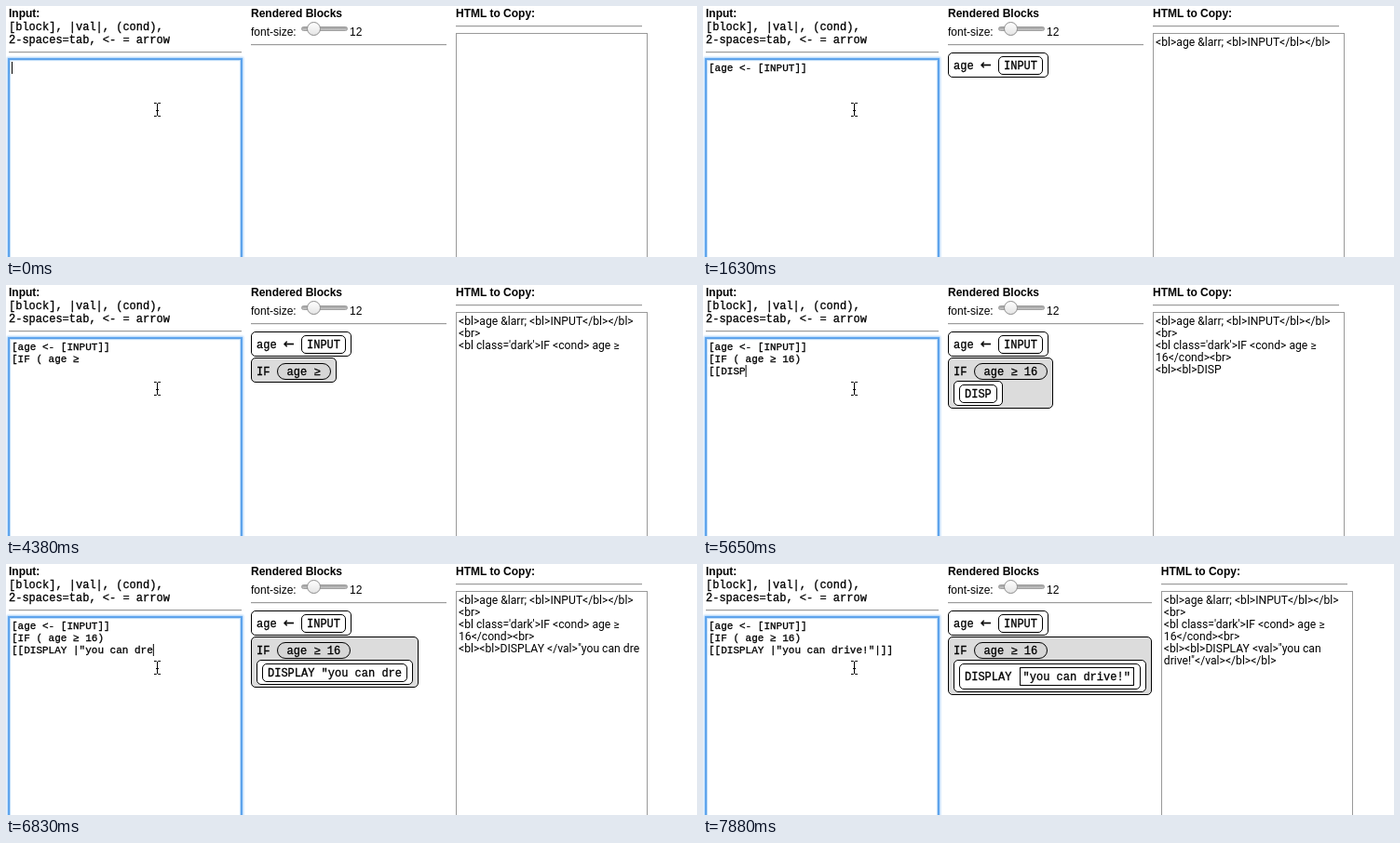
Recreate the animation shown at these times as an HTML page. Size 742 by 270 pixels, loop 8000 ms.

```html
<!DOCTYPE html>
<html lang="en">
<head>
<meta charset="utf-8">
<title>Block markup editor</title>
<style>
  html, body { margin: 0; width: 100%; height: 100%; overflow: hidden; background: #fff; }
  body { position: relative; color: #000; font: 12px/14px "Liberation Sans", sans-serif; }
  .at { position: absolute; white-space: pre; }
  .mono, tt { font-family: "Liberation Mono", monospace; -webkit-text-stroke: .3px #000; }
  .rule { position: absolute; height: 1px; background: #9a9a9a; border-bottom: 1px solid #eee; }

  .field { position: absolute; left: 3px; top: 57px; width: 248px; height: 240px;
    border: 1px solid #5a9fe8; box-shadow: 0 0 0 1px #62a8f0, 0 0 2px 2px #a9d1f9, inset 0 0 1px 1px #b9daf9; }
  #input, #caret { left: 6px; font-size: 11px; line-height: 13px; }
  #input { top: 61px; }
  #caret { top: 60px; width: 1px; height: 13px; background: #000; }

  .columns { position: absolute; left: 263px; top: 0; display: flex; }
  .column { position: relative; min-width: 210px; margin-right: 10px; }
  #blocks { padding-top: 49px; white-space: nowrap; }
  #markup { position: absolute; box-sizing: border-box; left: 0; top: 29px; width: 206px; height: 280px;
    padding: 3px 2px; border: 1px solid #999; white-space: pre-wrap; font: 12.15px/13px Roboto, sans-serif; }
  #markup i { font-style: normal; white-space: nowrap; }

  bl, cond, val { display: inline-block; border: 1px solid #000; }
  bl { margin-top: 1px; padding: 2px 5px; border-radius: 5px; background: #fff; }
  bl.dark { padding-top: 5px; background: #dcdcdc; }
  cond { padding: 1px 10px; border-radius: 9px; background: #d6d6d6; }
  val { margin: 1px; padding: 2px 3px; }
  tt { line-height: 0; }
  tt s { font: 14.3px/0 "DejaVu Sans", sans-serif; text-decoration: none; }

  svg { position: absolute; left: 0; top: 0; }
</style>
</head>
<body>
  <b class="at" style="left:3px;top:1px">Input:</b>
  <div class="at mono" style="left:3px;top:16px">[block], |val|, (cond),
2-spaces=tab, &lt;- = arrow</div>
  <div class="rule" style="left:3px;top:49px;width:250px"></div>
  <div class="field"></div>
  <div class="at mono" id="input"></div>
  <div class="at mono" id="caret"></div>

  <div class="columns">
    <div class="column">
      <b class="at" style="left:0;top:1px">Rendered Blocks</b>
      <span class="at" style="left:0;top:21px">font-size:</span>
      <span class="at" style="left:106px;top:21px">12</span>
      <div class="rule" style="left:0;right:0;top:41px"></div>
      <div id="blocks"></div>
    </div>
    <div class="column">
      <b class="at" style="left:0;top:1px">HTML to Copy:</b>
      <div class="rule" style="left:0;top:21px;width:200px"></div>
      <div id="markup"></div>
    </div>
  </div>

  <svg width="742" height="270">
    <defs>
      <linearGradient id="track" x2="0" y2="1"><stop stop-color="#999"/><stop offset="1" stop-color="#ccc"/></linearGradient>
      <linearGradient id="knob" x2="0" y2="1"><stop stop-color="#fff"/><stop offset="1" stop-color="#e4e4e4"/></linearGradient>
    </defs>
    <rect x="317.5" y="22.5" width="49" height="4" rx="2" fill="url(#track)" stroke="#a0a0a0"/>
    <circle cx="330.5" cy="24.5" r="7" fill="url(#knob)" stroke="#8c8c8c"/>
    <path d="M159 104.5h2.5l1 1 1-1h2.5M162.5 105v13M159 118.5h2.5l1-1 1 1h2.5M161 112.5h3" fill="none" stroke="#000"/>
  </svg>

<script>
const LOOP = 8000, BLINK = 220;
// [start ms, ms per key, keys]
const bursts = [
  [60, 105, '[age <-'],
  [890, 62, ' [INPUT]]'],
  [1650, 0, ' '],
  [1780, 150, '\n[IF '],
  [2590, 64, '( age >\b'],
  [3430, 230, '>\b≥ '],
  [4520, 130, '16)\n'],
  [5120, 95, '[[DISPLAY'],
  [5930, 84, ' |"you can'],
  [6730, 30, ' dre'],
  [6920, 95, '\bive!"|'],
  [7630, 30, ']]']
];
const keys = bursts.flatMap(([start, step, text]) =>
  [...text].map((key, i) => ({ time: start + i * step, key })));

const [input, caret, blocks, markup] =
  ['input', 'caret', 'blocks', 'markup'].map(id => document.getElementById(id));

const toMarkup = text => text
  .replace(/<-/g, '&larr;')
  .replace(/\[IF/g, "<bl class='dark'>IF")
  .replace(/\[/g, '<bl>').replace(/\]/g, '</bl>')
  .replace(/\(/g, '<cond>').replace(/\)/g, '</cond>')
  .replace(/\|([^|]*)\|/g, '<val>$1</val>').replace(/\|/g, '</val>')
  .replace(/\n/g, '<br>\n');

const toBlocks = html => html
  .replace(/(^|>)([^<]+)/g, '$1<tt>$2</tt>')
  .replace(/&larr;/g, '<s>&larr;</s>');

// Each word is kept whole so that lines wrap at spaces only.
const toListing = html => html
  .replace(/&/g, '&amp;').replace(/</g, '&lt;')
  .replace(/\S+/g, '<i>$&</i>');

let shown = null;

function draw() {
  const t = performance.now() % LOOP;
  let text = '', lastKey = 0;
  for (const { time, key } of keys) {
    if (time > t) break;
    text = key === '\b' ? text.slice(0, -1) : text + key;
    lastKey = time;
  }
  if (text !== shown) {
    shown = text;
    const html = toMarkup(text), lines = text.split('\n');
    input.textContent = text;
    blocks.innerHTML = toBlocks(html);
    markup.innerHTML = toListing(html);
    caret.style.transform = `translate(${lines.at(-1).length}ch, ${13 * (lines.length - 1)}px)`;
  }
  caret.style.visibility = (t - lastKey) % (2 * BLINK) < BLINK ? 'visible' : 'hidden';
  requestAnimationFrame(draw);
}
draw();
</script>
</body>
</html>
```
